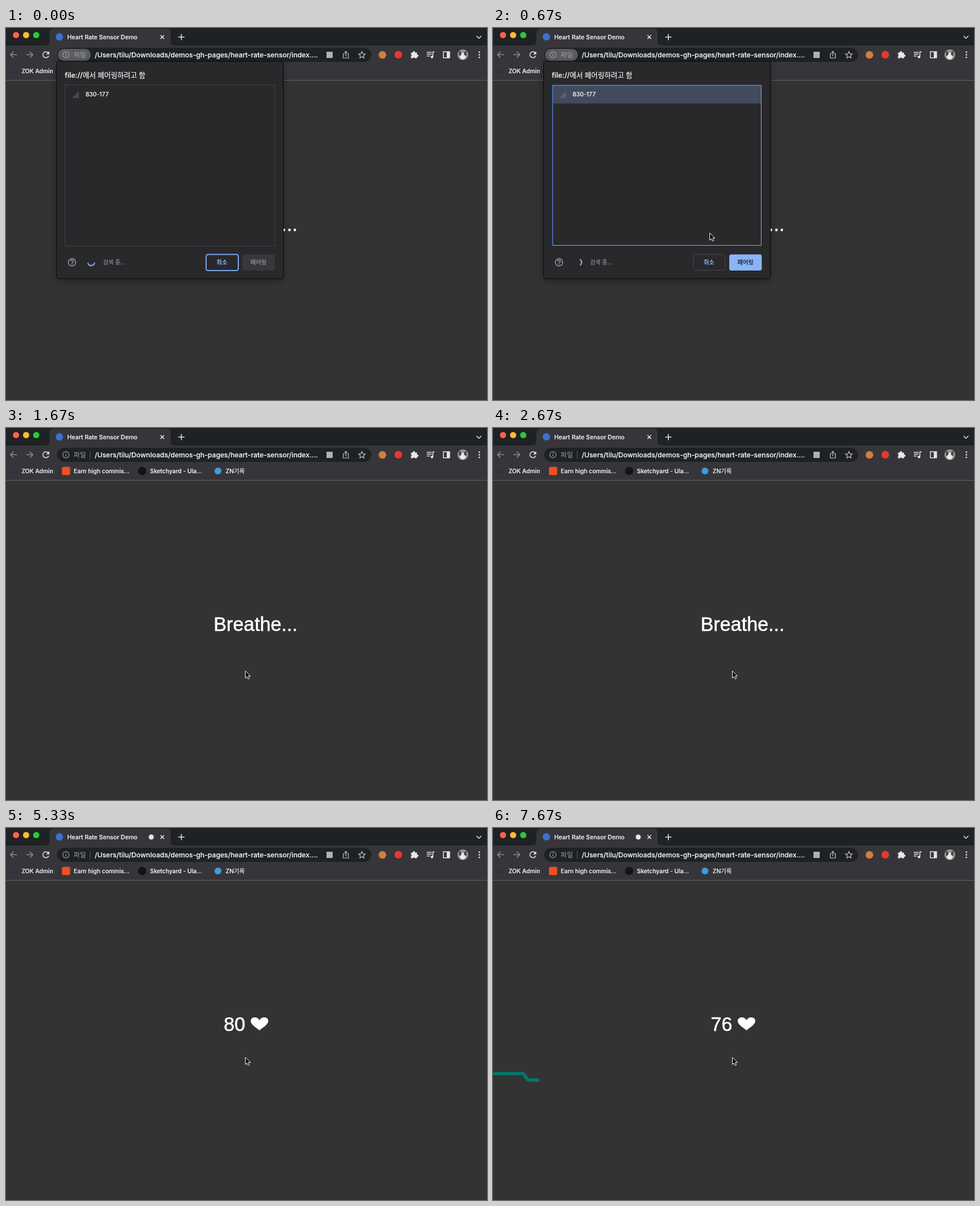
An HTML page that plays this animation: 851x658 px, repeating every 8000 ms.

```html
<!DOCTYPE html>
<html lang="ko">
<head>
<meta charset="utf-8">
<title>Heart Rate Sensor Demo</title>
<style>
  html, body { margin: 0; width: 100%; height: 100%; overflow: hidden; background: #333; }
  svg { display: block; width: 851px; height: 658px; }
  text { font: 500 10.4px Inter, "Noto Sans CJK KR", "Noto Sans CJK", sans-serif; fill: #f4f5f6; stroke: #f4f5f6; stroke-width: .2; white-space: pre; }
  .tab { font-size: 10.6px; }
  .url { font-size: 12.2px; }
  .chip { font-size: 11.9px; font-weight: 400; fill: #9fa2a6; stroke: none; }
  .title { font-size: 12.6px; }
  .status { font-size: 10px; font-weight: 400; fill: #a3a6aa; stroke: none; }
  .btn { font-size: 10.3px; font-weight: 700; text-anchor: middle; stroke: none; }
  .big { font: 34.3px "Liberation Sans", Arial, sans-serif; fill: #fff; stroke: #fff; stroke-width: .6; }
  .icon { fill: none; stroke: #e4e6e9; stroke-width: 1.5; }
  .dim { stroke: #8b8d91; }
  .solid { fill: #e4e6e9; stroke: none; }
  .trace { fill: none; stroke: #00796b; stroke-width: 5.8; stroke-linejoin: round; stroke-dasharray: 100 100; }

  .box, .bar, .idle, .picked, .paired, .wait, .beat, .first, .second, .cursor, .spin, .trace {
    animation: 8s step-end infinite;
  }
  .box { animation-name: box; }
  .bar { animation-name: bar; }
  .idle { animation-name: idle; }
  .picked { animation-name: picked; }
  .paired { animation-name: paired; }
  .wait { animation-name: wait; }
  .beat { animation-name: beat; }
  .first { animation-name: first; }
  .second { animation-name: second; }
  .cursor { animation-name: cursor; }
  .spin { animation-name: spin; }
  .trace { animation-name: trace; }

  @keyframes box { 0% { opacity: 1 } 12.5%, 100% { opacity: 0 } }
  @keyframes bar { 0% { opacity: 0 } 12.5%, 100% { opacity: 1 } }
  @keyframes idle { 0% { opacity: 1 } 4.125%, 100% { opacity: 0 } }
  @keyframes picked { 0% { opacity: 0 } 4.125%, 100% { opacity: 1 } }
  @keyframes paired { 0% { opacity: 0 } 50%, 100% { opacity: 1 } }
  @keyframes wait { 0% { opacity: 1 } 66.625%, 100% { opacity: 0 } }
  @keyframes beat { 0% { opacity: 0 } 66.625%, 100% { opacity: 1 } }
  @keyframes first { 0% { opacity: 1 } 91.625%, 100% { opacity: 0 } }
  @keyframes second { 0% { opacity: 0 } 91.625%, 100% { opacity: 1 } }
  @keyframes spin {
    0% { transform: rotate(5deg); stroke-dasharray: 165 195 }
    4.125% { transform: rotate(150deg); stroke-dasharray: 150 210 }
    8.375%, 100% { transform: rotate(-62deg); stroke-dasharray: 122 238 }
  }
  @keyframes cursor {
    0% { opacity: 0; transform: translate(330px, 118px) }
    4.125% { opacity: 1; transform: translate(330px, 118px) }
    8.375% { opacity: 1; transform: translate(383px, 362px) }
    12.5% { opacity: 1; transform: translate(448px, 426px) }
    16.625% { opacity: 1; transform: translate(434px, 425px) }
    20.875% { opacity: 1; transform: translate(423px, 429px) }
    54.125%, 100% { opacity: 1; transform: translate(423px, 405px) }
  }
  @keyframes trace {
    0% { stroke-dashoffset: 100 }
    70.875% { stroke-dashoffset: 96 }
    75% { stroke-dashoffset: 86 }
    79.125% { stroke-dashoffset: 76.5 }
    83.375% { stroke-dashoffset: 57 }
    87.5% { stroke-dashoffset: 47 }
    91.625% { stroke-dashoffset: 32.1 }
    95.875%, 100% { stroke-dashoffset: 12.6 }
  }
</style>
</head>
<body>
<svg viewBox="0 0 851 658">
  <!-- page -->
  <rect width="851" height="658" fill="#333"/>
  <path class="trace" d="M0 434.3H53L62.5 445.8H90"/>
  <text class="big wait" x="367.2" y="358.8">Breathe...</text>
  <g class="beat">
    <text class="big first" x="385.3" y="358.8">80</text>
    <text class="big second" x="385.3" y="358.8">76</text>
    <path fill="#fff" d="M448.5 358C446 355 433 348.5 433 341.5C433 337 436.5 335 440 335C444 335 447.5 337 448.5 340.5C449.5 337 453 335 457 335C460.5 335 464 337 464 341.5C464 348.5 451 355 448.5 358Z"/>
  </g>

  <!-- tab strip -->
  <rect width="851" height="31" fill="#1f2224"/>
  <rect y="31" width="851" height="61" fill="#36363a"/>
  <rect y="92" width="851" height="1" fill="#616265"/>
  <path fill="#36363a" d="M69 31Q77 31 77 23V9Q77 1 85 1H283Q291 1 291 9V23Q291 31 299 31Z"/>
  <circle cx="17.7" cy="12.5" r="5.5" fill="#ff5f57"/>
  <circle cx="35.6" cy="12.5" r="5.5" fill="#febc2e"/>
  <circle cx="53.5" cy="12.5" r="5.5" fill="#28c840"/>
  <circle cx="94.5" cy="15.7" r="6.6" fill="#3c70d2"/>
  <text class="tab" x="108.3" y="19.7">Heart Rate Sensor Demo</text>
  <circle class="paired" cx="257" cy="16" r="4.5" fill="#e4e6e9"/>
  <path class="icon" d="M273.3 12.8l6.4 6.4m0-6.4l-6.4 6.4M310.3 10.5v11m-5.5-5.5h11M832.5 14l4.3 4.3l4.3-4.3"/>

  <!-- toolbar -->
  <path class="icon dim" d="M19.5 47.3H8m5.5-5.5l-5.5 5.5l5.5 5.5M36 47.3h11.5m-5.5-5.5l5.5 5.5l-5.5 5.5"/>
  <path class="icon" d="M75 44.2A5.3 5.3 0 1 0 75.6 49"/>
  <path class="solid" d="M76.5 41v5.5H71Z"/>
  <rect x="90.5" y="35" width="555.5" height="25" rx="12.5" fill="#1f2224"/>
  <rect class="box" x="92" y="37" width="58" height="21" rx="10.5" fill="#5c5d60"/>
  <rect class="bar" x="148.5" y="41" width="1" height="13" fill="#5f6165"/>
  <g class="icon" style="stroke:#9fa2a6;stroke-width:1.2">
    <circle cx="106" cy="47.3" r="5.5"/>
    <path d="M106 46.5v3.8M106 44v1.3"/>
  </g>
  <text class="chip" x="119.8" y="51.6">파일</text>
  <text class="url" x="157" y="51.8">/Users/tilu/Downloads/demos-gh-pages/heart-rate-sensor/index....</text>
  <rect x="567" y="42" width="11" height="11" fill="#aeb1b5"/>
  <path class="icon" style="stroke:#c6c8cb;stroke-width:1.2" d="M599 45.5h-2.2v7.5h9v-7.5h-2.2M601.3 50V41.5m-2.5 2.4l2.5-2.5l2.5 2.5M629.7 41.5l1.7 4l4.2.4l-3.2 2.8l1 4.2l-3.7-2.2l-3.7 2.2l1-4.2l-3.2-2.8l4.2-.4Z"/>
  <circle cx="666" cy="47.5" r="6.7" fill="#d0803f"/>
  <circle cx="694" cy="47.3" r="6.8" fill="#e8382f"/>
  <path class="solid" d="M716.5 43.5h3.3a2 2 0 1 1 3.8 0h3.6v3.6a2 2 0 1 1 0 3.8v2.6h-3.7a2 2 0 0 0-3.6 0h-3.4v-3.5a2 2 0 0 0 0-3.5Z"/>
  <path class="icon" d="M744.5 43h8.5M744.5 46.3h8.5M744.5 49.6h5.5M755.3 51v-8.7h3"/>
  <circle class="solid" cx="753.6" cy="51.2" r="2.2"/>
  <rect class="icon" x="773.8" y="42" width="11" height="10.7"/>
  <rect class="solid" x="779.8" y="42" width="5" height="10.7"/>
  <circle cx="808.3" cy="47.3" r="9.5" fill="#99928f"/>
  <ellipse cx="808" cy="49.5" rx="5.5" ry="6" fill="#eceae7"/>
  <path fill="#4b4442" d="M801 41l4 1l1 5l-4 3ZM815 41l-4 1l-1 5l4 3Z"/>
  <circle class="solid" cx="837.5" cy="42.7" r="1.4"/>
  <circle class="solid" cx="837.5" cy="47.4" r="1.4"/>
  <circle class="solid" cx="837.5" cy="52.1" r="1.4"/>

  <!-- bookmarks -->
  <circle cx="13.5" cy="76" r="6" fill="#2c3446"/>
  <text x="27.5" y="79.6">ZOK Admin</text>
  <rect x="99" y="68.7" width="14.5" height="14.5" rx="2.5" fill="#f04e23"/>
  <text x="120" y="79.6">Earn high commis...</text>
  <circle cx="240.8" cy="76" r="7.3" fill="#141416"/>
  <text x="254.7" y="79.6">Sketchyard - Ula...</text>
  <circle cx="375" cy="76" r="6" fill="#3f9be0"/>
  <text x="388.6" y="79.6">ZN기록</text>

  <!-- pairing dialog -->
  <g class="box">
    <rect x="89.5" y="59" width="401" height="384.5" rx="4" fill="#29292c" stroke="#08080a" style="filter:drop-shadow(0 3px 6px rgba(0,0,0,.35))"/>
    <text class="title" x="104" y="88">file://에서 페어링하려고 함</text>
    <g class="idle">
      <rect x="104.5" y="100.5" width="371" height="285" fill="none" stroke="#424346"/>
      <path fill="#48494c" d="M129 112v12H117Z"/>
      <rect x="354" y="400.5" width="57" height="28.5" rx="3.5" fill="none" stroke="#79a5f0" stroke-width="2"/>
      <rect x="418" y="400.5" width="57.5" height="28.5" rx="3.5" fill="#37383b"/>
      <text class="btn" x="446.7" y="418.3" style="fill:#85888c">페어링</text>
    </g>
    <g class="picked">
      <rect x="105" y="101.5" width="369.5" height="32" fill="#414b5c"/>
      <path fill="#59616d" d="M129 112v12H117Z"/>
      <path fill="none" stroke="#a5a8ad" d="M474.5 101.5V384.5H105.5"/>
      <path fill="none" stroke="#4d88e6" stroke-width="1.3" d="M105.5 385V101.5H474.5"/>
      <rect x="354.5" y="400.5" width="56" height="28" rx="3" fill="none" stroke="#47484c"/>
      <rect x="418" y="400.5" width="57.5" height="28.5" rx="3.5" fill="#8ab4f8"/>
      <text class="btn" x="446.7" y="418.3" style="fill:#27303f">페어링</text>
    </g>
    <text x="140.7" y="121.3">830-177</text>
    <text class="btn" x="382" y="418.3" style="fill:#8ab4f8">취소</text>
    <g class="icon" style="stroke:#a3a6aa;stroke-width:1.4">
      <circle cx="116.8" cy="414.5" r="6.5"/>
      <path d="M114.6 413a2.2 2.2 0 1 1 3.4 1.7q-1.2.8-1.2 1.8M116.8 417.3v1.4"/>
    </g>
    <g transform="translate(150.8 414.3)">
      <circle class="spin" r="6" pathLength="360" fill="none" stroke="#8ab4f8" stroke-width="2"/>
    </g>
    <text class="status" x="171.7" y="418">검색 중...</text>
  </g>

  <g class="cursor">
    <path fill="#000" stroke="#fff" d="M.5.7V13.3L3.3 10.7L5.3 15L7.5 14L5.5 9.7H9.5Z"/>
  </g>
</svg>
</body>
</html>
```
